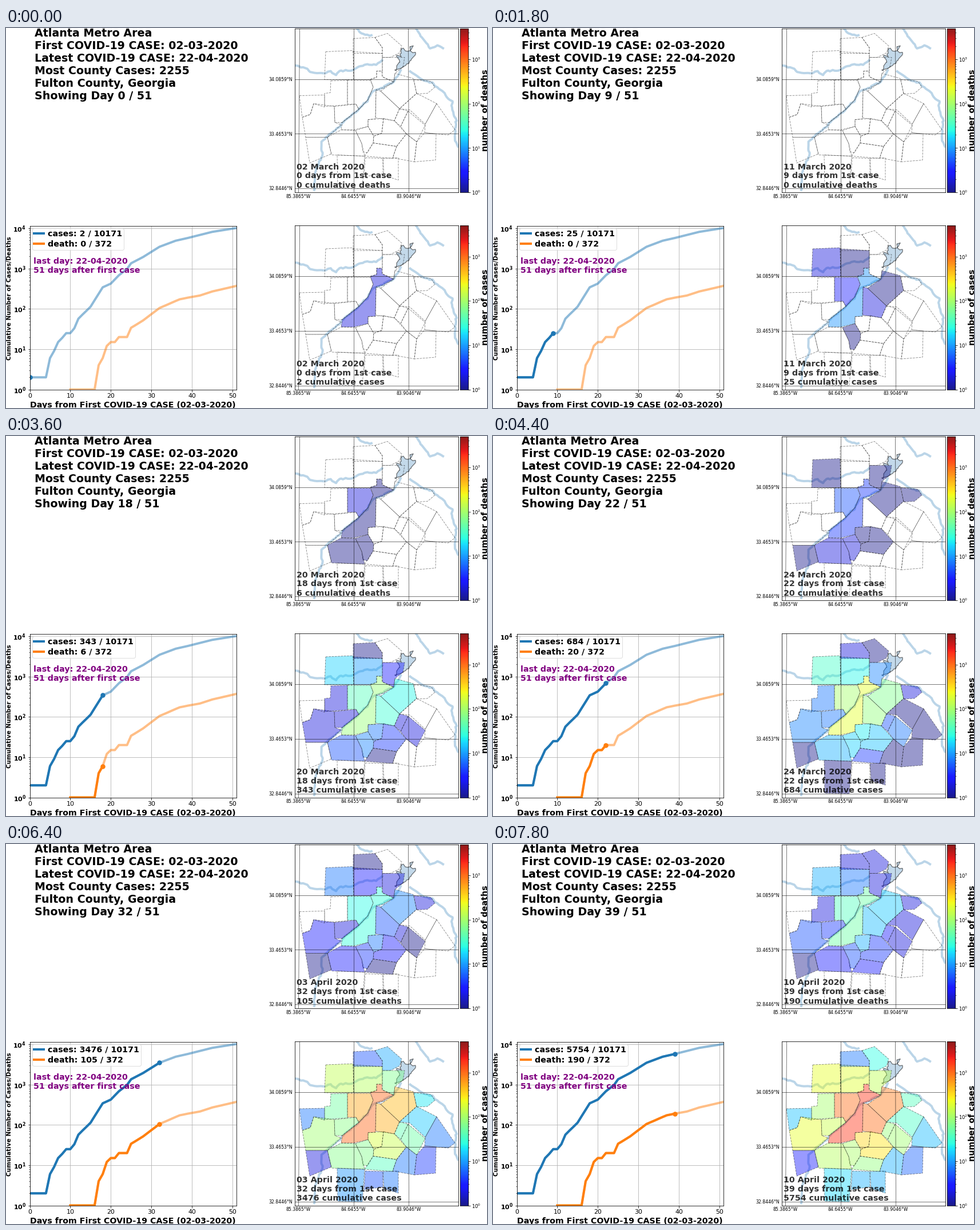
Write a matplotlib script that moves like this. It is 841 by 666 pixels and loops after 8 s.

```python
import numpy as np
import matplotlib.pyplot as plt
from matplotlib.animation import FuncAnimation
from matplotlib.lines import Line2D
from matplotlib.patches import Polygon

W, H, DPI = 841, 666, 64
PT = 72 / DPI            # points per pixel
SHIFT = 345.5            # vertical distance between the two maps
DAYS, LAST = 40, 51
VMAX = 5000
BLUE, ORANGE = "tab:blue", "tab:orange"

plt.rcParams.update({"font.family": "DejaVu Sans", "axes.linewidth": 0.8 * PT,
                     "lines.scale_dashes": False})
fig = plt.figure(figsize=(W / DPI, H / DPI), dpi=DPI, facecolor="white")
rng = np.random.default_rng(7)


def box(x0, y0, x1, y1):
    return fig.add_axes([x0 / W, 1 - y1 / H, (x1 - x0) / W, (y1 - y0) / H])


def label(x, y, text, size, bold=True, **kw):
    kw.setdefault("va", "baseline")
    return fig.text(x / W, 1 - y / H, text, fontsize=size * PT,
                    fontweight="bold" if bold else "normal", **kw)


# ---- totals: geometric growth between a few key days --------------------
days = np.arange(LAST + 1)


def totals(*keys):
    d, n = np.transpose(keys)
    logs = np.interp(days, d, np.log(n))
    return np.where(days < d[0], 0, np.rint(np.exp(logs))).astype(int)


cases = totals((0, 2), (4, 2), (5, 6), (7, 15), (9, 25), (10, 25), (11, 33),
               (12, 57), (15, 113), (18, 343), (20, 424), (22, 684),
               (24, 978), (25, 1355), (28, 1947), (32, 3476), (36, 4920),
               (39, 5754), (45, 8150), (51, 10171))
deaths = totals((10, 1), (16, 1), (17, 4), (18, 6), (19, 12), (20, 15),
                (21, 15), (22, 20), (24, 20), (25, 34), (28, 52), (32, 105),
                (37, 173), (39, 190), (42, 215), (45, 270), (51, 372))


def level(curve, day):
    """Count that starts at one and eases out, on a log scale, to its end."""
    start, end, seed = curve
    if day < start:
        return seed
    seed = max(seed, 1)
    ease = 1 - (1 - (day - start) / (DAYS - 1 - start)) ** 1.6
    return round(seed * (end / seed) ** ease)


# ---- counties: corners, then (first day, count on the final day) --------
counties = []


def county(sick, dead, *corners, seed=0):
    counties.append((corners, (*sick, seed), (*(dead or (DAYS, 0)), 0)))


# north
county((6, 210), (22, 12), (559, 387), (607, 385), (608, 436), (557, 436))
county((9, 195), (27, 7), (607, 387), (658, 390), (658, 421), (648, 421),
       (648, 432), (637, 436), (608, 436))
county((17, 7), (28, 2), (607, 364), (645, 362), (658, 380), (658, 390),
       (607, 390))
county((22, 25), (36, 2), (645, 362), (667, 355), (692, 377), (688, 389),
       (672, 397), (658, 397), (658, 380))
county((15, 130), (22, 2), (658, 397), (697, 397), (694, 414), (680, 425),
       (678, 440), (658, 431))
# centre
county((4, 1700), (17, 50), (637, 435), (648, 432), (648, 421), (657, 421),
       (658, 431), (678, 440), (658, 451), (647, 454), (646, 505),
       (633, 506), (633, 518), (608, 524), (586, 524), (588, 511),
       (617, 488), (633, 471), (642, 449), seed=2)
county((5, 960), (14, 38), (597, 437), (637, 437), (642, 449), (633, 471),
       (617, 488), (612, 479), (597, 479))
county((7, 950), (26, 13), (647, 454), (655, 456), (688, 487), (679, 508),
       (646, 503))
county((8, 850), (22, 15), (655, 456), (678, 440), (680, 425), (712, 434),
       (718, 460), (688, 487))
county((12, 350), (22, 12), (633, 506), (660, 504), (657, 530), (643, 535),
       (633, 518))
county((9, 105), (18, 5), (611, 525), (633, 518), (643, 535), (642, 547),
       (632, 564), (624, 563), (622, 548))
county((14, 300), (21, 4), (660, 504), (679, 508), (700, 531), (683, 553),
       (642, 547), (643, 535), (657, 530))
# west
county((23, 14), None, (513, 464), (557, 463), (557, 484), (538, 478),
       (532, 497), (518, 502))
county((15, 100), (34, 2), (568, 438), (597, 437), (597, 480), (557, 483),
       (557, 460), (567, 459))
county((16, 210), (27, 5), (518, 502), (532, 497), (538, 478), (574, 483),
       (575, 511), (586, 515), (562, 537), (524, 537))
county((16, 150), (26, 4), (574, 483), (612, 479), (617, 488), (588, 511),
       (575, 511))
county((12, 120), (16, 3), (562, 537), (586, 524), (611, 525), (622, 548),
       (627, 570), (569, 568))
county((20, 3), (21, 1), (524, 537), (562, 537), (569, 566), (531, 582))
# east
county((16, 85), (25, 3), (688, 487), (703, 491), (690, 518), (679, 508))
county((15, 95), (31, 2), (703, 491), (733, 516), (718, 545), (700, 531),
       (690, 518))
county((22, 35), (35, 2), (718, 460), (753, 478), (733, 514), (706, 489),
       (688, 487))
county((22, 13), None, (753, 478), (785, 524), (773, 533), (732, 529),
       (733, 514))
county((19, 40), (20, 2), (713, 436), (743, 439), (750, 449), (737, 460),
       (718, 461))
# south
county((21, 6), None, (718, 545), (732, 529), (752, 531), (751, 577),
       (714, 580))
county((20, 12), None, (683, 553), (700, 531), (718, 545), (714, 580),
       (676, 573))
county((18, 80), (30, 3), (627, 570), (642, 547), (683, 553), (676, 574))
county((21, 17), None, (579, 568), (627, 570), (623, 627), (580, 626))
county((26, 12), None, (628, 573), (659, 574), (659, 601), (626, 606))
county((20, 12), None, (659, 574), (686, 573), (686, 612), (661, 604))


# ---- water --------------------------------------------------------------
def meander(*points, size=0.7, step=4):
    """Path through the points with small seeded bends on the way."""
    p = np.array(points, float)
    along = np.r_[0, np.cumsum(np.hypot(*np.diff(p, axis=0).T))]
    at = np.arange(0, along[-1], step)
    path = np.transpose([np.interp(at, along, axis) for axis in p.T])
    return path + rng.normal(0, size, path.shape)


rivers = [
    meander((504, 411), (525, 416), (534, 424), (560, 425), (566, 421),
            (577, 428), (584, 420), (604, 420), (623, 411), (648, 409),
            (659, 402)),
    meander((613, 346), (619, 353), (636, 360), (641, 354)),
    meander((717, 346), (728, 364), (742, 381), (757, 376), (766, 383)),
    meander((706, 422), (731, 438), (745, 442), (764, 457), (773, 470),
            (781, 474), (779, 486), (787, 506), (785, 540), (791, 554)),
    meander((690, 420), (678, 440), (658, 451), (642, 455), (633, 471),
            (617, 488), (588, 511), (585, 517), (561, 536), (551, 546),
            (553, 567), (540, 600), (539, 634)),
]
lake = meander((680, 420), (688, 406), (683, 395), (691, 395), (691, 381),
               (698, 386), (702, 388), (708, 376), (712, 378), (707, 387),
               (717, 389), (703, 409), (690, 418), size=1.3, step=3)


# ---- maps ---------------------------------------------------------------
def make_map(dy, kind):
    ax = box(505, 346.3 + dy, 791, 633.5 + dy)
    ax.set(xlim=(505, 791), ylim=(633.5, 346.3), xticks=[], yticks=[])
    for path in rivers:
        ax.plot(*path.T, color=BLUE, alpha=0.3, lw=4 * PT,
                solid_joinstyle="round", zorder=1)
    ax.add_patch(Polygon(lake, fc="#c3d9ea", ec="#63686c", lw=1.2 * PT,
                         zorder=1.5))
    fills = []
    for corners, *_ in counties:
        fills.append(ax.add_patch(Polygon(corners, ec="none", zorder=2)))
        ax.add_patch(Polygon(corners, fc="none", ec=(0, 0, 0, 0.5),
                             lw=0.8 * PT, ls=(0, (3.7 * PT, 1.6 * PT)),
                             zorder=3))
    grid = dict(color="black", alpha=0.65, lw=0.8 * PT, zorder=4)
    for x, lean, name in [(512.5, -1, "85.3865"), (607.7, 0, "84.6455"),
                          (704, 0.5, "83.9046")]:
        ax.plot([x - lean, x + lean], [346, 634], **grid)
        label(x + lean, 640.5 + dy, name + "°W", 7.8, False,
              ha="center", va="center")
    for y, name in [(435, "34.0859"), (530.7, "33.4653"), (626.5, "32.8446")]:
        ax.plot([505, 791], [y, y], **grid)
        label(501, y + dy, name + "°N", 7.8, False, ha="right",
              va="center_baseline")
    lines = [label(507.5, y + dy, "", 14.25, color="black", alpha=0.8)
             for y in (593, 609, 625)]

    bar = box(793.5, 346.3 + dy, 808, 633.5 + dy)
    top = np.log10(VMAX)
    bar.imshow(np.linspace(0, 1, 256)[:, None], cmap="jet", alpha=0.9,
               origin="lower", extent=(0, 1, 0, top), aspect="auto")
    bar.set_xticks([])
    bar.yaxis.tick_right()
    bar.set_yticks(range(4), [f"$10^{k}$" for k in range(4)])
    minor = [k + np.log10(m) for k in range(4) for m in range(2, 10)]
    bar.set_yticks([m for m in minor if m < top], minor=True)
    bar.tick_params(length=3.5 * PT, width=0.8 * PT, pad=2.5 * PT,
                    labelsize=8.5 * PT)
    bar.tick_params(which="minor", length=2 * PT, width=0.6 * PT)
    label(845.3, 489.5 + dy, "number of " + kind, 14.25, rotation=90,
          ha="right", va="center")
    return fills, lines


death_map = make_map(-SHIFT, "deaths")
case_map = make_map(0, "cases")

# ---- chart --------------------------------------------------------------
ax = box(41.5, 346.5, 403, 633.5)
ax.set_yscale("log")
ax.set(xlim=(0, LAST), ylim=(1, 11600))
ax.grid(True, color="#b0b0b0", lw=0.8 * PT)
ax.set_xticks(range(0, 51, 10))
ax.set_yticks([10 ** k for k in range(5)],
              [rf"$\mathbf{{10^{k}}}$" for k in range(5)])
ax.tick_params(length=3.5 * PT, width=0.8 * PT, pad=3 * PT,
               labelsize=11 * PT)
ax.tick_params(which="minor", length=2 * PT, width=0.6 * PT)

series = []
for data, color in [(cases, BLUE), (deaths, ORANGE)]:
    start = np.argmax(data > 0)
    ax.plot(days[start:], data[start:], color=color, alpha=0.5, lw=4 * PT)
    line, = ax.plot([], [], color=color, lw=4 * PT)
    dot, = ax.plot([], [], "o", color=color, ms=8.5 * PT, mew=0)
    series.append((line, dot, data, start))

legend = ax.legend(
    handles=[Line2D([], [], color=c, lw=4 * PT) for c in (BLUE, ORANGE)],
    labels=["cases", "death"], loc="upper left",
    prop={"weight": "bold", "size": 14.25 * PT}, borderaxespad=0.3,
    borderpad=0.2, handlelength=1.25, handletextpad=0.45, labelspacing=0.3)
legend.get_frame().set_linewidth(0.8 * PT)

label(48.5, 413, "last day: 22-04-2020", 14.25, color="purple")
label(48.5, 429, "51 days after first case", 14.25, color="purple")
label(222, 664.5, "Days from First COVID-19 CASE (02-03-2020)", 14.25,
      ha="center")
label(11, 474, "Cumulative Number of Cases/Deaths", 10.5, rotation=90,
      ha="right", va="center")

# ---- heading ------------------------------------------------------------
heading = ["Atlanta Metro Area", "First COVID-19 CASE: 02-03-2020",
           "Latest COVID-19 CASE: 22-04-2020", "Most County Cases: 2255",
           "Fulton County, Georgia", ""]
heading = [label(50, 15.3 + 21.95 * i, s, 19) for i, s in enumerate(heading)]

jet = plt.get_cmap("jet")


def paint(fills, column, day):
    for fill, info in zip(fills, counties):
        n = level(info[column], day)
        shade = jet(np.log(n) / np.log(VMAX), alpha=0.4) if n else "none"
        fill.set_facecolor(shade)


def date(day):
    d = day + 2
    return f"{d:02d} March 2020" if d <= 31 else f"{d - 31:02d} April 2020"


def update(day):
    heading[-1].set_text(f"Showing Day {day} / {LAST}")
    for (fills, lines), data, kind, column in [
            (case_map, cases, "cases", 1), (death_map, deaths, "deaths", 2)]:
        paint(fills, column, day)
        lines[0].set_text(date(day))
        lines[1].set_text(f"{day} days from 1st case")
        lines[2].set_text(f"{data[day]} cumulative {kind}")
    for (line, dot, data, start), text, name in zip(
            series, legend.get_texts(), ("cases", "death")):
        line.set_data(days[start:day + 1], data[start:day + 1])
        shown = day >= start
        dot.set_data([day] if shown else [], [data[day]] if shown else [])
        text.set_text(f"{name}: {data[day]} / {data[-1]}")
    return []


anim = FuncAnimation(fig, update, frames=DAYS, interval=200, repeat=True,
                     repeat_delay=0, init_func=lambda: update(0), blit=False)
plt.show()
```
